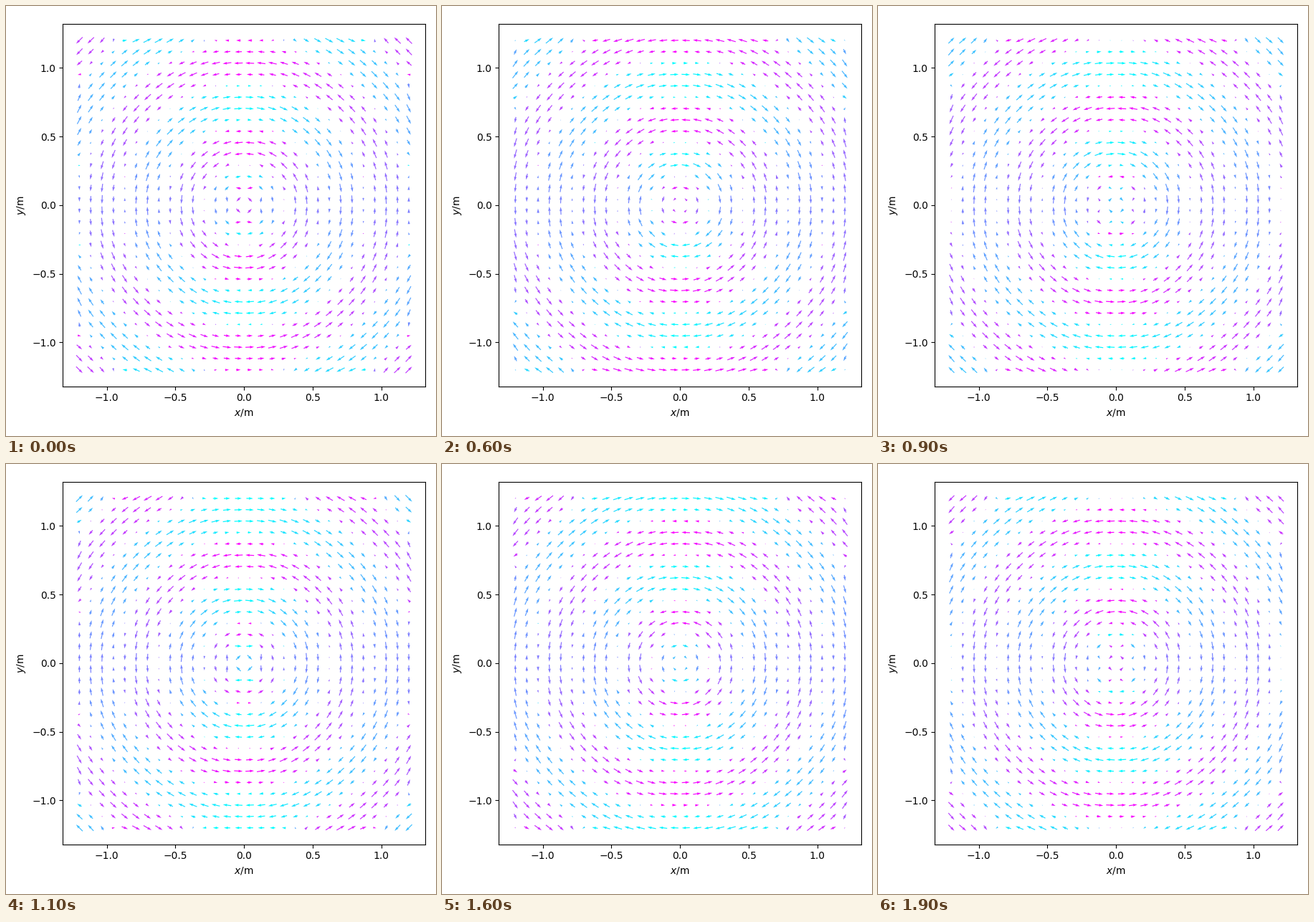
Recreate the animation shown at these times as a matplotlib script. Size 600 by 600 pixels, loop 2 s.

```python
import numpy as np
import matplotlib.pyplot as plt
from matplotlib.animation import FuncAnimation

FRAMES = 20
INTERVAL = 100          # ms
WAVELENGTH = 0.6        # m
MAX_LEN = 12            # arrow length at a crest, px
POWER = 0.7             # compresses the range of lengths

k = 2 * np.pi / WAVELENGTH
axis = np.linspace(-1.2, 1.2, 30)
X, Y = np.meshgrid(axis, axis)
R = np.hypot(X, Y)
crest = np.sin(k * (axis[1] - axis[0]))

# Outgoing wave, damped and reversed near the centre
amp = (1 - 1.8 * np.exp(-(R / 0.15) ** 2)) / (k * R)
weight = k * np.hypot(R, 0.06 * np.exp(-R / 0.3))


def field(frame):
    """Arrow components in px and their colour value."""
    phase = 2 * np.pi * frame / FRAMES
    a_y, a_x = np.gradient(amp * np.cos(k * R - phase))
    u, v = -a_y * weight, a_x * weight
    size = np.hypot(u, v) + 1e-12
    gain = MAX_LEN * (size / crest) ** POWER / size
    hue = np.arctan2(-u * np.sign(Y), np.abs(v))
    return u * gain, v * gain, hue


fig, ax = plt.subplots(figsize=(6, 6), dpi=100)
arrows = ax.quiver(X, Y, *field(0), cmap="cool", pivot="mid",
                   scale_units="dots", scale=1, width=0.0024)
arrows.set_clim(-np.pi / 2, np.pi / 2)
ax.set_aspect("equal")
ax.set_xlabel("$x$/m")
ax.set_ylabel("$y$/m")
fig.tight_layout()


def update(frame):
    arrows.set_UVC(*field(frame))
    return (arrows,)


anim = FuncAnimation(fig, update, frames=FRAMES, interval=INTERVAL,
                     repeat=True, repeat_delay=0)
plt.show()
```
